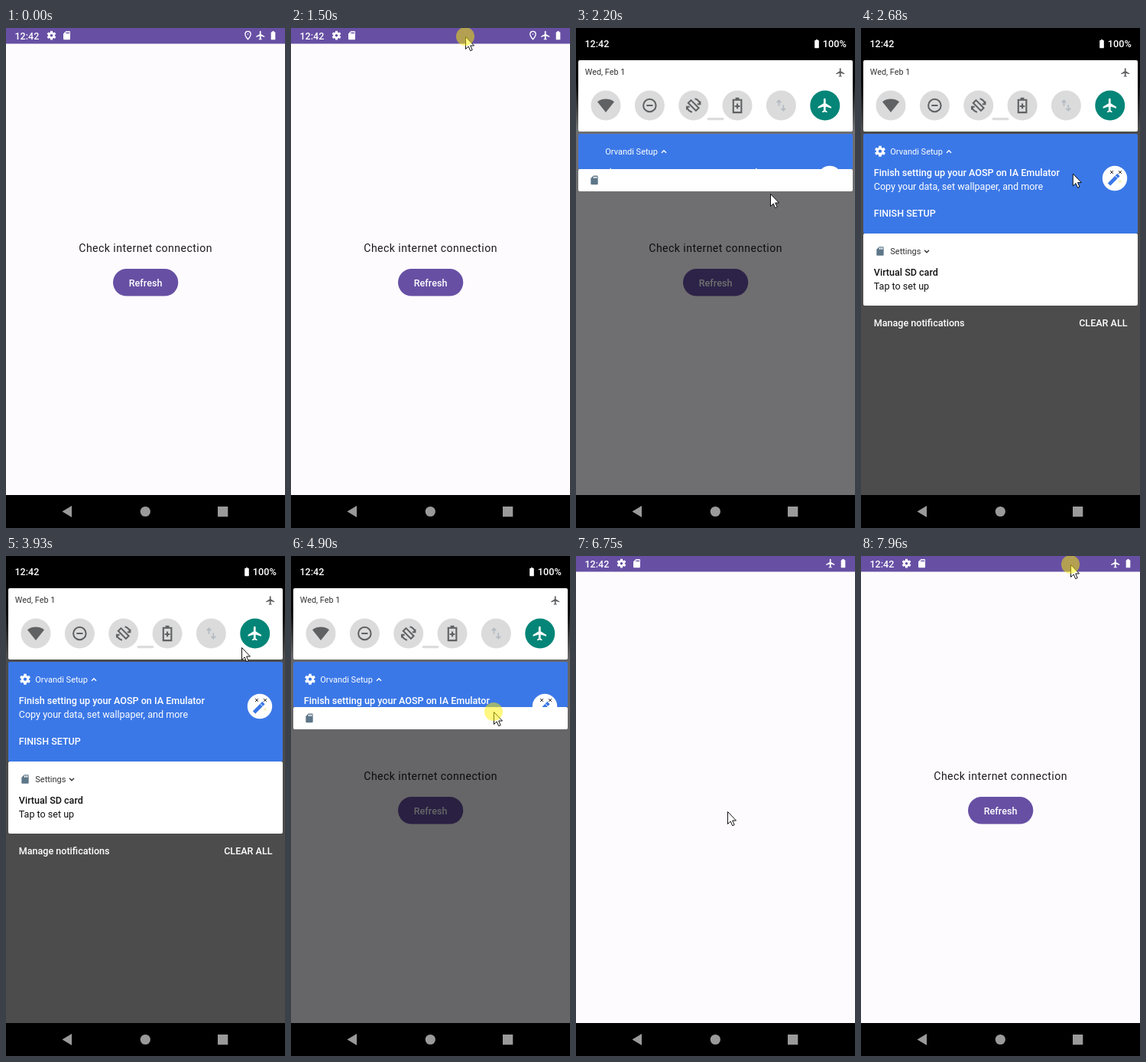
Recreate the animation shown at these times as an HTML page with a canvas. Size 365 by 652 pixels, loop 8 s.

```html
<!DOCTYPE html>
<html lang="en">
<head>
<meta charset="utf-8">
<title>Connection check</title>
<style>
html, body { margin: 0; width: 100%; height: 100%; overflow: hidden; background: #000; }
canvas { display: block; }
</style>
</head>
<body>
<canvas id="stage" width="365" height="652"></canvas>
<script>
const ctx = document.getElementById('stage').getContext('2d');
const LOOP = 8000, TICK = 69;
const PURPLE = '#6750a4', BLUE = '#3b78e7', GREY = '#5f6163';
const clamp = v => Math.max(0, Math.min(1, v));

// Tracks: [time, value, ...]
const cursorTrack = [
  [200, 338, 517], [700, 218, 100], [820, 216, 60], [960, 231, 21], [1170, 228, 11],
  [1580, 228, 11], [2201, 254, 216], [2400, 262, 236], [2700, 278, 186], [3000, 322, 90],
  [3260, 342, 195], [3500, 340, 95], [3680, 322, 74], [3926, 308, 119], [4070, 306, 126],
  [4480, 270, 340], [4580, 269, 340], [4892, 265, 203], [5130, 250, 70], [5420, 236, 235],
  [5720, 215, 328], [6130, 198, 333], [7220, 198, 333], [7560, 286, 80], [7750, 274, 11]
];
const shadeTrack = [
  [1580, 0], [2201, 213], [2400, 345], [2600, 362],
  [4580, 362], [4892, 226], [5130, 90], [5330, 0]
];
const presses = [[1500, 2150], [4560, 5140], [6200, 6440], [7955, LOOP]];

// Monotone cubic interpolation, flat at turning points and holds
function track(keys, t, col = 1) {
  const last = keys.length - 1;
  if (t <= keys[0][0]) return keys[0][col];
  if (t >= keys[last][0]) return keys[last][col];
  const slope = i => i < 0 || i >= last ? 0 :
    (keys[i + 1][col] - keys[i][col]) / (keys[i + 1][0] - keys[i][0]);
  const tangent = i => {
    const a = slope(i - 1), b = slope(i);
    return a * b > 0 ? 2 * a * b / (a + b) : 0;
  };
  const i = keys.findIndex(k => k[0] > t) - 1;
  const d = keys[i + 1][0] - keys[i][0], u = (t - keys[i][0]) / d, v = 1 - u;
  return keys[i][col] * (1 + 2 * u) * v * v + tangent(i) * d * u * v * v
    + keys[i + 1][col] * (3 - 2 * u) * u * u - tangent(i + 1) * d * u * u * v;
}

// Icons on a 24-unit grid
const icons = {
  plane: 'M21 16v-2l-8-5V3.5c0-.83-.67-1.5-1.5-1.5S10 2.67 10 3.5V9l-8 5v2l8-2.5V19l-2 1.5V22l3.5-1 3.5 1v-1.5L13 19v-5.5z',
  sd: 'M18 2h-8L4 8v12q0 2 2 2h12q2 0 2-2V4q0-2-2-2zM12 8h-2V4h2zM15 8h-2V4h2zM18 8h-2V4h2z',
  battery: 'M8 4h2V2h4v2h2q1 0 1 1v16q0 1-1 1H8q-1 0-1-1V5q0-1 1-1z',
  pin: 'M12 2.5C8 2.5 5.5 5.5 5.5 9c0 5 6.500 12 6.500 12s6.500-7 6.500-12c0-3.500-2.500-6.500-6.500-6.500zM11 9h2',
  wifi: 'M12 21.500L.5 7C4 4 8 3 12 3s8 1 11.500 4z',
  dnd: 'M3 12a9 9 0 1 0 18 0a9 9 0 1 0-18 0M7.500 12h9',
  rotate: 'M8.500 4.500L19.500 15.500L15.500 19.500L4.500 8.500zM14 2.500Q20 4 21.500 10M21.500 6v4h-4M10 21.500Q4 20 2.500 14M2.500 18v-4h4',
  saver: 'M6.500 4.500h11v17h-11zM9.500 2.500h5M12 9.500v7M8.500 13h7',
  data: 'M8.500 13V4M5 7.500L8.500 4L12 7.500M15.500 11v9M12 16.500l3.500 3.500l3.500-3.500',
  gear: 'M6.500 12a5.500 5.500 0 1 0 11 0a5.500 5.500 0 1 0-11 0'
};
for (const name in icons) icons[name] = new Path2D(icons[name]);

function icon(name, x, y, size, color, line = 0) {
  ctx.save();
  ctx.translate(x, y);
  ctx.scale(size / 24, size / 24);
  if (name === 'gear') {
    ctx.fillStyle = color;
    for (let i = 0; i < 6; i++, ctx.rotate(Math.PI / 3)) ctx.fillRect(-2.7, -10.5, 5.4, 5);
    line = 4.6;
  }
  ctx.translate(-12, -12);
  ctx.fillStyle = ctx.strokeStyle = color;
  ctx.lineWidth = line;
  if (line) ctx.stroke(icons[name]);
  else ctx.fill(icons[name], 'evenodd');
  ctx.restore();
}

function text(str, x, y, size, color, weight = 400, align = 'left', spacing = 0) {
  ctx.font = `${weight} ${size}px Roboto, sans-serif`;
  ctx.letterSpacing = spacing + 'px';
  ctx.textAlign = align;
  ctx.fillStyle = color;
  ctx.fillText(str, x, y);
}

function rect(x, y, w, h, color, r = 0) {
  ctx.fillStyle = color;
  ctx.beginPath();
  ctx.roundRect(x, y, w, h, r);
  ctx.fill();
}

function circle(x, y, r, color) {
  ctx.fillStyle = color;
  ctx.beginPath();
  ctx.arc(x, y, r, 0, 7);
  ctx.fill();
}

function line(points, color, width) {
  ctx.strokeStyle = color;
  ctx.lineWidth = width;
  ctx.beginPath();
  points.forEach(p => ctx.lineTo(...p));
  ctx.stroke();
}

function clipped(x, y, w, h, draw) {
  ctx.save();
  ctx.beginPath();
  ctx.roundRect(x, y, w, h, 2);
  ctx.clip();
  draw();
  ctx.restore();
}

function drawApp(t) {
  rect(0, 0, 365, 609, '#fefbff');
  rect(0, 0, 365, 20.5, PURPLE);
  text('12:42', 11.5, 14.7, 12.5, '#fff', 500);
  icon('gear', 59.5, 9.7, 13.5, '#fff');
  icon('sd', 79.5, 9.7, 13.5, '#fff');
  if (t < 5000) icon('pin', 316.5, 9.7, 13.5, '#fff', 2.4);
  icon('plane', 333, 9.7, 14, '#fff');
  icon('battery', 349.5, 9.7, 13.5, '#fff');
  if (t >= 6745 && t < 6805) return;
  text('Check internet connection', 95.3, 291.8, 14.1, '#1c1b1f', 400, 'left', 0.44);
  rect(140, 314, 85.3, 35.6, PURPLE, 17.8);
  text('Refresh', 182.6, 336.7, 12.5, '#fff', 500, 'center', 0.05);
  if (t > 6200 && t < 6610) {
    ctx.save();
    ctx.beginPath();
    ctx.roundRect(140, 314, 85.3, 35.6, 17.8);
    ctx.clip();
    const fade = clamp((6610 - t) / 130);
    circle(198, 333, (t - 6200) * 0.35, `rgba(255,255,255,${0.16 * fade})`);
    ctx.restore();
  }
}

function drawQuickSettings() {
  rect(3, 42, 359, 93, '#fff', 2);
  text('Wed, Feb 1', 11.8, 60.6, 10.8, '#333');
  icon('plane', 346, 58, 14, GREY);
  const tiles = [['wifi', 23, 0], ['dnd', 22, 2.2], ['rotate', 22, 2.2],
    ['saver', 23, 2.2], ['data', 20, 2], ['plane', 22, 0]];
  tiles.forEach(([name, size, width], i) => {
    const x = 39 + i * 57.35;
    circle(x, 101, 19.5, i === 5 ? '#048577' : '#dbdbdb');
    icon(name, x, 101, size, i === 5 ? '#fff' : i === 4 ? '#b2bac2' : GREY, width);
  });
  rect(171.500, 117, 22, 3.2, '#dcdcdc', 1.6);
}

function drawSetupCard(height, settled) {
  clipped(3, 138, 359, height, () => {
    rect(3, 138, 359, 130, BLUE);
    if (settled) icon('gear', 25, 160.7, 16, '#fff');
    text('Orvandi Setup', 38.3, 165, 11, '#fff');
    line([[112, 162.7], [115, 159.7], [118, 162.7]], '#fff', 1.4);
    text('Finish setting up your AOSP on IA Emulator', 16.8, 193.2, 12.6, '#fff', 500);
    text('Copy your data, set wallpaper, and more', 16.8, 211.2, 12.55, '#fff');
    text('FINISH SETUP', 16.8, 246.3, 12.5, '#fff', 500);
    circle(332, 196, 16.2, '#fff');
    line([[324.5, 204], [337, 191.5]], BLUE, 4.6);
    line([[332.7, 192.8], [335.7, 195.8]], '#fff', 1);
    for (const x of [328, 339]) {
      line([[x - 2, 186], [x + 2, 190]], '#333', 1);
      line([[x - 2, 190], [x + 2, 186]], '#333', 1);
    }
    line([[337, 198], [341, 202]], '#f5e7a4', 1);
    line([[337, 202], [341, 198]], '#f5e7a4', 1);
  });
}

function drawStorageCard(top, height) {
  const open = clamp((height - 29) / 65);
  clipped(3, top, 359, height, () => {
    rect(3, top, 359, height, '#fff');
    icon('sd', 24 + open, top + 14.3 + 8.7 * open, 14, '#5d7688');
    ctx.globalAlpha = open;
    text('Settings', 38.3, top + 27, 11, '#333');
    line([[83, top + 21.7], [86, top + 24.7], [89, top + 21.7]], '#333', 1.4);
    text('Virtual SD card', 16.8, top + 55.2, 12.55, '#111', 500);
    text('Tap to set up', 16.8, top + 73, 12.55, '#111');
  });
}

function drawShade(h, t) {
  rect(0, 0, 365, 609, `rgba(0,0,0,${Math.min(0.7, h * 0.00263)})`);
  rect(0, 0, 365, 609, `rgba(76,76,76,${clamp((h - 250) / 80)})`);
  const dark = ctx.createLinearGradient(0, 70, 0, 130);
  dark.addColorStop(0, `rgba(0,0,0,${clamp(h / 150)})`);
  dark.addColorStop(1, 'rgba(0,0,0,0)');
  rect(0, 0, 365, 130, dark);

  ctx.save();
  ctx.translate(0, Math.min(0, h - 213));
  const room = Math.max(h, 213) - 138, blue = Math.min(130, room - 29);
  drawQuickSettings();
  drawSetupCard(blue, t > 2270);
  drawStorageCard(138 + blue, room - blue);
  ctx.restore();

  ctx.globalAlpha = clamp((h - 120) / 80);
  text('12:42', 11.5, 25.2, 12.5, '#fff', 500);
  icon('battery', 315, 20.5, 13.5, '#fff');
  text('100%', 353.7, 25.2, 12.7, '#fff', 500, 'right');
  ctx.globalAlpha = clamp((h - 345) / 17);
  text('Manage notifications', 16.8, 389, 12.55, '#fff', 500);
  text('CLEAR ALL', 348.5, 389, 12.55, '#fff', 500, 'right');
  ctx.globalAlpha = 1;
}

function drawNavBar() {
  rect(0, 609, 365, 43, '#000');
  ctx.fillStyle = '#9a9a9a';
  ctx.fill(new Path2D('M73.500 630.500L86 623V638z'));
  circle(182.3, 630.5, 6.6, '#9a9a9a');
  rect(277, 624, 13.3, 13.3, '#9a9a9a');
}

const arrow = new Path2D('M.5 .5V16.500L4.200 13L6.700 18.700L9.200 17.600L6.700 12H11.500z');

function drawCursor(x, y, pressed) {
  ctx.save();
  ctx.translate(x, y);
  ctx.fillStyle = '#fff';
  ctx.strokeStyle = '#111';
  ctx.lineWidth = 1;
  ctx.fill(arrow);
  ctx.stroke(arrow);
  ctx.restore();
  if (pressed) circle(x, y, 12, 'rgba(255,240,0,.5)');
}

function render(now) {
  const t = now % LOOP;
  const step = 200 + Math.floor((t - 188) / TICK) * TICK;
  const shade = track(shadeTrack, step);
  drawApp(t);
  if (shade > 0) drawShade(shade, t);
  drawNavBar();
  if (t >= 200) {
    const pressed = presses.some(([from, to]) => t >= from && t < to);
    drawCursor(track(cursorTrack, step), track(cursorTrack, step, 2), pressed);
  }
  requestAnimationFrame(render);
}
requestAnimationFrame(render);
</script>
</body>
</html>
```
